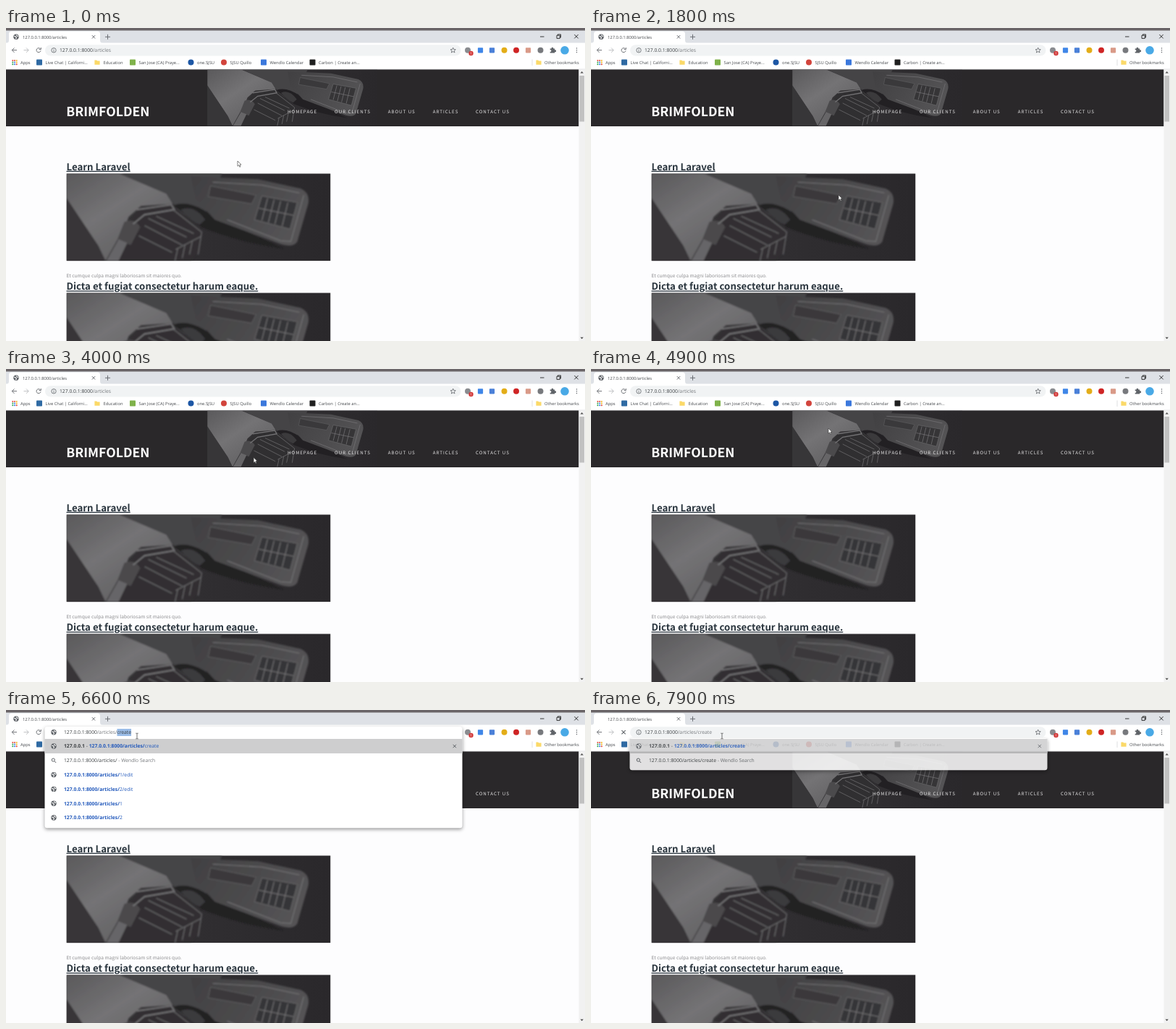
Recreate the animation shown at these times as an HTML page. Size 800 by 433 pixels, loop 8 s.

```html
<!DOCTYPE html>
<html lang="en">
<head>
<meta charset="utf-8">
<title>Articles</title>
<style>
  html, body { margin: 0; width: 100%; height: 100%; overflow: hidden; background: #fdfdfe; }
  svg { display: block; }
  text { text-rendering: geometricPrecision; white-space: pre; }
  .ui { font: 5.82px "Open Sans", "Noto Sans", sans-serif; fill: #45484c; }
  .bar { font: 6.77px "Open Sans", "Noto Sans", sans-serif; fill: #3c4043; }
  .page { font-family: "Noto Sans CJK JP", "Noto Sans CJK SC", "Noto Sans CJK", "Open Sans", sans-serif; }
  .title { font-size: 13.25px; font-weight: 700; fill: #2b363f; text-decoration: underline; text-decoration-thickness: 1px; }
  .nav { font-size: 6.2px; letter-spacing: 1px; fill: #e4e3e4; }
  .line { fill: none; stroke: #5f6368; }
  .dim { fill: #74777b; }
  .link { fill: #2158bb; }
  .bold { font-weight: 700; }
  #popup { filter: drop-shadow(0 2px 2.5px rgba(0, 0, 0, .4)); }
</style>
</head>
<body>
<svg width="800" height="433" viewBox="0 0 800 433">
  <defs>
    <linearGradient id="backdrop"><stop stop-color="#39383a"/><stop offset=".5" stop-color="#302e31"/><stop offset="1" stop-color="#2a282b"/></linearGradient>
    <linearGradient id="boot" x2=".8" y2="1"><stop stop-color="#5a595b"/><stop offset=".45" stop-color="#747375"/><stop offset="1" stop-color="#5c5b5d"/></linearGradient>
    <linearGradient id="plug" x2="1" y2=".4"><stop stop-color="#414042"/><stop offset=".5" stop-color="#4a494b"/><stop offset="1" stop-color="#545355"/></linearGradient>
    <filter id="soft"><feGaussianBlur stdDeviation=".9"/></filter>

    <symbol id="photo" viewBox="0 0 365 121">
      <rect width="365" height="121" fill="url(#backdrop)"/>
      <g filter="url(#soft)">
        <path d="M75 0H215L190 60Q168 68 150 45L138 28Z" fill="#454446"/>
        <path d="M148 44Q170 36 198 56L300 104Q240 96 186 74Z" fill="#222023"/>
        <path d="M158 50Q176 42 192 64L184 71Q172 66 158 50Z" fill="#3b3a3c"/>
        <path d="M172 4L265 8L324 21Q337 27 334 42L319 94Q314 103 297 98L205 64L178 34Z" fill="url(#plug)"/>
        <path d="M199 17L262 30L256 42L196 32Z" fill="#3a393b" stroke="#5f5e60"/>
        <path d="M270 31L319 40L309 77L260 64Z" fill="#363537" stroke="#6a696b"/>
        <path d="M278 34L270 65M287 36L279 68M296 38L288 70M306 40L298 73M266 48L314 58M328 30L310 94L296 93L222 64M202 12L270 16L322 27" fill="none" stroke="#767577" stroke-width="1.1"/>
        <path d="M0 0H73L138 28L147 42L103 45L86 60L74 92L54 121L44 100L0 34Z" fill="url(#boot)"/>
        <path d="M0 34L44 100L54 121H0Z" fill="#373638"/>
        <path d="M100 47L146 43L187 80L184 108L172 121H54L72 89Z" fill="#302f31"/>
        <path d="M80 67Q94 61 102 74L89 99L70 92Z" fill="#4b4a4c"/>
        <path d="M72 91L84 96L72 121H55Z" fill="#666567"/>
        <path d="M97 50L145 43L149 50L108 57L92 70" fill="none" stroke="#737274" stroke-width="2"/>
        <path d="M113 62L166 88M108 72L160 99M124 59L176 83M100 86L146 109M146 49L187 81L182 112M151 105L186 87M154 103L150 121M164 98L160 117M174 93L170 112" fill="none" stroke="#656466" stroke-width="1.4"/>
      </g>
    </symbol>
    <g id="globe"><circle r="3.7" fill="#5f6368"/><path d="M-2.8-1L-.5-.3L.4 1.2L-.5 3M.5-3L1-1.4L3-.8" fill="none" stroke="#fff" stroke-width="1.1"/></g>
    <g id="lens" class="line"><circle cx="-.7" cy="-.7" r="2.1"/><path d="M.9 .9L3.2 3.2"/></g>
    <path id="cross" d="M-2.2-2.2L2.2 2.2M2.2-2.2L-2.2 2.2"/>
    <path id="folder" d="M-3.6-3h2.8l1 1h3.4v5.2h-7.2z" fill="#fbd968"/>
  </defs>

  <rect width="800" height="433" fill="#fdfdfe"/>
  <g class="page" transform="translate(.5 .3)">
    <rect x="-1" y="57" width="792" height="78.7" fill="#2a282a"/>
    <use href="#photo" x="277.7" y="57.2" width="235" height="78"/>
    <text x="82.8" y="122" font-size="17.6" font-weight="700" fill="#fff">BRIMFOLDEN</text>
    <g class="nav" id="nav"></g>
    <text class="title" x="83" y="196.4">Learn Laravel</text>
    <use href="#photo" x="83" y="201" width="365" height="121"/>
    <text x="83" y="344.8" font-size="6.61" font-weight="300" fill="#8d8d8f">Et cumque culpa magni laboriosam sit maiores quo.</text>
    <text class="title" x="83" y="362">Dicta et fugiat consectetur harum eaque.</text>
    <use href="#photo" x="83" y="366" width="365" height="121"/>
  </g>
  <rect x="791.5" y="57" width="9" height="376" fill="#f1f1f1"/>
  <rect x="792.5" y="66" width="6.5" height="63.5" fill="#c1c1c1"/>
  <path d="M793.5 62.5l2.2-2.4l2.2 2.4zM793.5 427.8l2.2 2.4l2.2-2.4z" fill="#505050"/>

  <rect width="800" height="21" fill="#dee1e6"/>
  <rect width="800" height="3.5" fill="#696467"/>
  <path d="M0 21Q4 21 4 17V8Q4 4.5 8 4.5H126Q130 4.5 130 8V17Q130 21 134 21Z" fill="#fff"/>
  <rect y="20.5" width="800" height="36.5" fill="#fff"/>
  <path d="M0 56.8H800" stroke="#dcdee1" stroke-width=".6"/>
  <use id="favicon" href="#globe" x="14" y="12.3"/>
  <text class="ui" x="23" y="14.5">127.0.0.1:8000/articles</text>
  <g class="line" stroke-width=".9">
    <use href="#cross" x="121" y="12.3"/>
    <path d="M137 12.3H144M140.5 8.8V15.8"/>
    <path d="M738 12H743.5M761 10.2H765.2V14.4H761ZM762.3 10V8.9H766.5V13.1H765.4M785.3 9L790.7 14.4M790.7 9L785.3 14.4" stroke="#222"/>
    <path d="M15 30.7H8.5M11.5 27.5L8.3 30.7L11.5 33.9"/>
    <path d="M24.5 30.7H31M28 27.5L31.2 30.7L28 33.9" stroke="#b8babd"/>
    <path id="reload" d="M47.4 28.8A3 3 0 1 0 48 31.4M48.3 27V29.6H45.6"/>
    <use id="stop" href="#cross" transform="translate(45 30.7) scale(1.2)"/>
  </g>
  <g id="extensions"></g>
  <circle cx="642.5" cy="35" r="3.2" fill="#d23b3b"/>
  <text x="641.2" y="37" font-size="5" font-family="Open Sans, sans-serif" fill="#fff">1</text>
  <path d="M751.7 28.5H753.6A1.4 1.4 0 1 1 756.3 28.5H758.2V30.4A1.4 1.4 0 1 1 758.2 33V34.5H751.7V32.8A1.3 1.3 0 1 0 751.7 30.3Z" fill="#5f6368"/>
  <path d="M788.5 28V33.8" stroke="#5f6368" stroke-width="1.5" stroke-linecap="round" stroke-dasharray="0 2.8"/>
  <g id="bookmarks" class="ui"></g>

  <g id="popup">
    <rect id="sheet" x="53.5" width="577" rx="3.5" fill="#fff"/>
    <rect x="53.5" y="40" width="577" height="20" fill="#cececf"/>
    <g id="rows" class="bar"></g>
    <use href="#cross" class="line" x="619.8" y="50"/>
  </g>
  <rect id="pill" x="54" y="23.3" width="574.5" height="15.2" rx="7.6"/>
  <path id="star" class="line" stroke-width=".8" d="M617.7 27.2L618.7 29.6L621.3 29.8L619.3 31.5L620 34L617.7 32.6L615.4 34L616.1 31.5L614.1 29.8L616.7 29.6Z"/>
  <g id="info" class="line" stroke-width=".8"><circle cx="66" cy="30.8" r="3.2"/><path d="M66 30.3V32.8M66 28.7V29.5"/></g>
  <use id="site" href="#globe" x="66" y="30.8"/>
  <rect id="selection" y="26" height="10" fill="#9bbde8"/>
  <text id="url" class="bar" y="33.2"></text>

  <g id="pointer">
    <path id="arrow" d="M0 0V7.2L1.7 5.7L2.9 8.3L4 7.8L2.9 5.2L5 5.1Z" fill="#fff" stroke="#333" stroke-width=".6"/>
    <path id="beam" d="M-1.7-3.8H-.4L0-3.4L.4-3.8H1.7M0-3.4V3.4M-1.7 3.8H-.4L0 3.4L.4 3.8H1.7" fill="none" stroke="#333" stroke-width=".7"/>
  </g>
</svg>
<script>
const LOOP = 8000, HOST = '127.0.0.1:8000', PATH = '/articles', TAIL = '/create';
const $ = id => document.getElementById(id);
const show = (id, on) => $(id).style.display = on ? '' : 'none';
const label = (x, y, s) => `<text x="${x}" y="${y}">${s}</text>`;
const disc = (x, y, r, color) => `<circle cx="${x}" cy="${y}" r="${r}" fill="${color}"/>`;
const square = (x, y, r, color) => `<rect x="${x - r}" y="${y - r}" width="${2 * r}" height="${2 * r}" rx=".8" fill="${color}"/>`;
const folder = (x, y) => `<use href="#folder" x="${x}" y="${y}"/>`;

$('nav').innerHTML = [[388.6, 'HOMEPAGE'], [453.6, 'OUR CLIENTS'], [527.2, 'ABOUT US'], [589.2, 'ARTICLES'], [648.5, 'CONTACT US']]
  .map(([x, s]) => label(x, 118, s)).join('');

$('extensions').innerHTML = [
  [disc, 638, '#8a8c90'], [square, 655.5, '#3f86e8'], [square, 671.5, '#4a80d8'], [disc, 688.5, '#e3ad18'],
  [disc, 705, '#cf2424'], [square, 721.5, '#d99a88'], [disc, 738.5, '#77797d']
].map(([shape, x, color]) => shape(x, 30.8, shape === disc ? 4 : 3.6, color)).join('') + disc(772, 30.8, 5.8, '#49a9e6');

const appDots = ['#e24a3b', '#e24a3b', '#f0b51f', '#36a853', '#4285f4', '#f0b51f', '#36a853', '#4285f4', '#e24a3b']
  .map((color, i) => square(9.3 + i % 3 * 2.7, 44.9 + Math.floor(i / 3) * 2.7, 1, color)).join('');
$('bookmarks').innerHTML = appDots + label(20, 49.7, 'Apps') + [
  [46, square, '#2f6aa3', 54.5, 'Live Chat | Californi...'],
  [126, folder, '', 134.5, 'Education'],
  [175, square, '#7fb24a', 183.5, 'San Jose (CA) Praye...'],
  [255.5, disc, '#1d57a5', 264, 'one.SJSU'],
  [301, disc, '#d2443c', 309.5, 'SJSU Quillo'],
  [356, square, '#3b78dc', 364.5, 'Wendlo Calendar'],
  [423.5, square, '#1f1f1f', 432, 'Carbon | Create an...'],
  [736, folder, '', 744, 'Other bookmarks']
].map(([x, shape, color, tx, s]) => shape(x, 47.6, 4, color) + label(tx, 49.7, s)).join('')
  + '<path d="M727 43.5V52" stroke="#d0d2d5" stroke-width=".7"/>';

// Pointer stops: time, x, y
const stops = [
  [0, 320, 184], [300, 320, 184], [1100, 342, 231], [1850, 342, 231], [2300, 364, 185], [3200, 364, 185],
  [4600, 328, 82], [5000, 328, 82], [5800, 228, 38], [6000, 181, 36], [LOOP, 181, 36]
];

function pointerAt(t) {
  const i = stops.findIndex(stop => stop[0] > t);
  const [t0, x0, y0] = stops[i - 1], [t1, x1, y1] = stops[i];
  const k = (t - t0) / (t1 - t0), e = k * k * (3 - 2 * k);
  return [x0 + (x1 - x0) * e, y0 + (y1 - y0) * e];
}

function popupRows(typed) {
  const base = HOST + PATH, rest = TAIL.slice(typed.length);
  const search = `${base}${typed}<tspan class="dim"> - Wendlo Search</tspan>`;
  const page = s => `<tspan class="link"><tspan class="bold">${base}/</tspan>${s}</tspan>`;
  const rows = [
    `<tspan class="bold">127.0.0.1</tspan> - <tspan class="link"><tspan class="bold">${base}${typed}</tspan>${rest}</tspan>`,
    search
  ];
  if (typed.length === 1) rows.push(...['1/edit', '2/edit', '1', '2'].map(page));
  return rows;
}

function draw(t) {
  const [x, y] = pointerAt(t), over = y < 39;
  $('pointer').setAttribute('transform', `translate(${x} ${y})`);
  show('arrow', !over);
  show('beam', over);

  const open = t >= 6550, leaving = t >= 7850, editing = open && !leaving;
  const focused = t >= 6200 && !leaving, allSelected = t >= 6200 && t < 6350;
  const typed = open ? TAIL.slice(0, 1 + Math.floor((t - 6550) / 150)) : '';

  show('popup', open);
  if (open) {
    const rows = popupRows(typed), top = leaving ? 39 : 23;
    $('popup').style.opacity = leaving ? .86 : 1;
    $('sheet').setAttribute('y', top);
    $('sheet').setAttribute('height', 43.3 + 20 * rows.length - top);
    $('rows').innerHTML = rows.map((s, i) => {
      const cy = 50 + 19.8 * i;
      return `<use href="#${i === 1 ? 'lens' : 'globe'}" x="66" y="${cy}"/>` + label(80, cy + 2.4, s);
    }).join('');
  }

  const pill = $('pill');
  show('pill', !editing);
  pill.setAttribute('fill', focused ? '#fff' : over && !leaving ? '#e8eaed' : '#f1f3f4');
  pill.setAttribute('stroke', focused ? '#6f9fe0' : 'none');
  show('star', !editing);
  show('info', !editing);
  show('site', editing);
  show('favicon', !leaving);
  show('reload', !leaving);
  show('stop', leaving);

  const left = editing ? 80 : 74, url = $('url'), selection = $('selection');
  const rest = open ? TAIL.slice(typed.length) : '';
  url.setAttribute('x', left);
  url.innerHTML = allSelected
    ? `<tspan>${HOST}${PATH}</tspan>`
    : `${HOST}<tspan class="dim">${PATH}${typed}</tspan><tspan>${rest}</tspan>`;
  const width = allSelected || rest ? url.lastChild.getComputedTextLength() : 0;
  selection.setAttribute('x', left + url.getComputedTextLength() - width);
  selection.setAttribute('width', width);
}

function tick() {
  draw(performance.now() % LOOP);
  requestAnimationFrame(tick);
}
tick();
</script>
</body>
</html>
```
